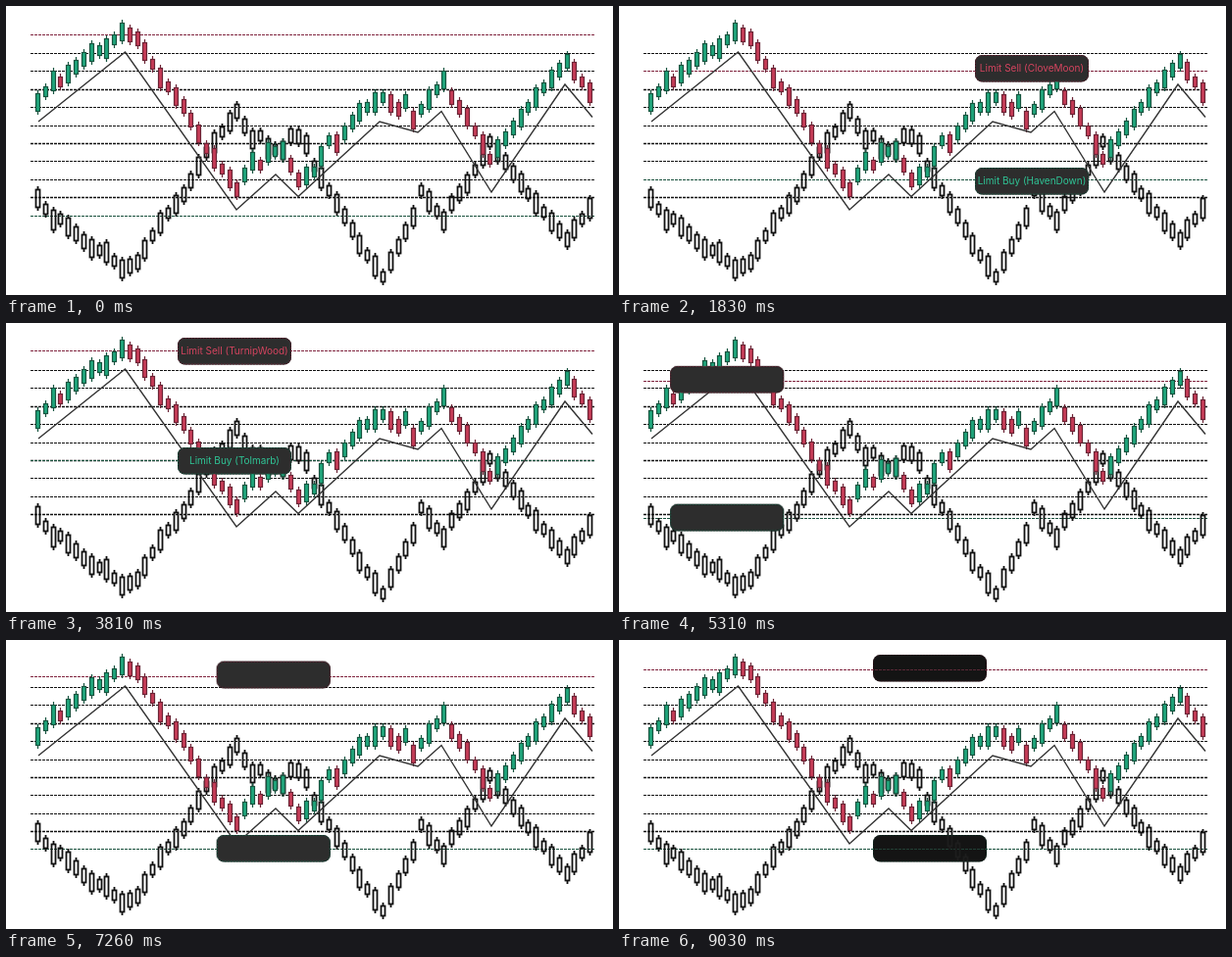
Write an HTML page that moves like this. It is 619 by 295 pixels and loops after 9060 ms.

```html
<!DOCTYPE html>
<html lang="en">
<head>
<meta charset="utf-8">
<title>Limit orders</title>
<style>
html, body { margin: 0; width: 100%; height: 100%; overflow: hidden; background: #fff; }
svg { display: block; width: 619px; height: 295px; }

.move, .back, .box, .label { animation: 9060ms linear infinite; }
.move { animation-name: move; animation-timing-function: cubic-bezier(.33, 1, .68, 1); }
.back { animation-name: back; }
.box { animation-name: box; }

/* Stops of each moving part, in order */
.sell { --a: 496px 15px; --b: 363px 50px; --c: 175px 15px; --d: 22px 51px; --e: 259px 15px; }
.buy { --a: 496px 199px; --b: 363px 165px; --c: 175px 127px; --d: 22px 199px; --e: 259px 199px; }
.ask { --a: 0 29px; --b: 0 66px; --c: 0 28px; --d: 0 66px; --e: 0 30px; stroke: #80253f; }
.bid { --a: 0 214px; --b: 0 177px; --c: 0 140px; --d: 0 213px; --e: 0 213px; stroke: #19513d; }

.rule { stroke-width: 1; stroke-dasharray: 3 1; shape-rendering: crispEdges; }
.grid { stroke: #111; }
.grid.bold { stroke-width: 1.5; shape-rendering: auto; }
.trend { fill: none; stroke: #333; stroke-width: 1.4; }

.candle { stroke-width: 1.2; }
.up { fill: #20a67c; stroke: #17543f; }
.down { fill: #c63c57; stroke: #6b2435; }
.hollow { fill: none; stroke: #111; stroke-width: 1.8; }

.box rect { fill: #2d2d2d; stroke-width: 1; stroke-dasharray: 2 1; }
.sell .box rect { stroke: #5e2634; }
.buy .box rect { stroke: #1f5443; }
.label { font: 400 10px Inter, "Open Sans", sans-serif; text-anchor: middle; }
.sell .label { fill: #d5445f; }
.buy .label { fill: #2fc596; }
.t0 { animation-name: t0; }
.t1 { animation-name: t1; }
.t2 { animation-name: t2; }
.t3 { animation-name: t3; }
.t4 { animation-name: t4; }

@keyframes move {
  0%, 11.42% { translate: var(--a); }
  20.5%, 31.9% { translate: var(--b); }
  42.05%, 54.3% { translate: var(--c); }
  64.57%, 75.7% { translate: var(--d); }
  86%, 100% { translate: var(--e); }
}
@keyframes back {
  0%, .3% { opacity: 0; }
  .31%, 100% { opacity: 1; }
}
@keyframes box {
  0%, .3% { opacity: 0; }
  .31% { opacity: .1; }
  4.97%, 96.85% { opacity: 1; }
  100% { opacity: .4; }
}
@keyframes t0 {
  0%, 1.5% { opacity: 0; }
  4.97%, 11.42% { opacity: 1; }
  13.6%, 100% { opacity: 0; }
}
@keyframes t1 {
  0%, 16.4% { opacity: 0; }
  20.2%, 31.9% { opacity: 1; }
  34.1%, 100% { opacity: 0; }
}
@keyframes t2 {
  0%, 37.5% { opacity: 0; }
  42.05%, 54.3% { opacity: 1; }
  56.5%, 100% { opacity: 0; }
}
@keyframes t3 {
  0%, 60% { opacity: 0; }
  67.5% { opacity: .92; }
  75.7% { opacity: 1; }
  77.9%, 100% { opacity: 0; }
}
@keyframes t4 {
  0%, 81.5% { opacity: 0; }
  86.1%, 96.85% { opacity: 1; }
  98.9%, 100% { opacity: 0; }
}
</style>
</head>
<body>
<svg id="stage" viewBox="0 0 619 295"></svg>
<script>
const names = {
  Sell: ["FernyDock", "CloveMoon", "TurnipWood", "VoKn", "MistyOak"],
  Buy: ["PlumeHut", "HavenDown", "Tolmarb", "GolNob", "Gorseby"]
};

const count = 73;
const mirror = 294.5;

// Turning points: candle index, y of the body's middle
const price = [
  [0, 98], [2, 76], [3, 77], [7, 47], [9, 43], [11, 26], [13, 33], [16, 73], [19, 102],
  [22, 145], [26, 187], [28, 158], [29, 162], [30, 149], [32, 147], [34, 177], [36, 169],
  [38, 137], [39, 140], [42, 108], [45, 93], [47, 105], [48, 97], [49, 116], [53, 75],
  [54, 93], [56, 113], [59, 156], [65, 93], [69, 56], [72, 88]
];
// Where the hollow series leaves the mirrored price
const dip = [[34, 133], [35, 141], [36, 163], [40, 214], [42, 243], [45, 276], [49, 215]];

function along(points, i) {
  const k = Math.max(1, points.findIndex(p => p[0] >= i));
  const [x0, y0] = points[k - 1], [x1, y1] = points[k];
  return y0 + (y1 - y0) * (i - x0) / (x1 - x0);
}

function bodySize(i) {
  return Math.round(16 + 5 * Math.cos(Math.PI * i) * Math.cos(Math.PI * (i - 2) / 7));
}

function candle(i, middle, kind) {
  const x = Math.round(33 + i * 7.82) - .5;
  const size = bodySize(i);
  const top = Math.round(middle - size / 2);
  return `<g class="candle ${kind}">
    <path d="M${x} ${top - 3}v3M${x} ${top + size}v3"/>
    <rect x="${x - 2}" y="${top + .5}" width="4" height="${size - 1}"/></g>`;
}

function solid(i) {
  const y = along(price, i);
  const falls = i > 0 && y > along(price, i - 1);
  return candle(i, y, falls ? "down" : "up");
}

function hollow(i) {
  const inDip = i >= dip[0][0] && i <= dip.at(-1)[0];
  return candle(i, inDip ? along(dip, i) : mirror - along(price, i), "hollow");
}

function repeat(n, draw) {
  return Array.from({ length: n }, (_, i) => draw(i)).join("");
}

function rule(y, kind) {
  return `<path class="rule ${kind}" d="M25 ${y}H600"/>`;
}

function gridRule(i) {
  return rule(Math.round(48 + i * 18.4) + .5, i % 3 === 2 ? "grid bold" : "grid");
}

function card(side) {
  const text = names[side].map((name, i) =>
    `<text class="label t${i}" x="58" y="17">Limit ${side} (${name})</text>`).join("");
  return `<g class="move ${side.toLowerCase()}">
    <g class="box"><rect x=".5" y=".5" width="115" height="26.5" rx="7"/></g>${text}</g>`;
}

function back(side) {
  return `<g class="move ${side}"><rect class="back" width="116" height="27.5" rx="7.5"/></g>`;
}

document.getElementById("stage").innerHTML =
  back("sell") + back("buy") + repeat(9, gridRule) +
  rule(.5, "move ask") + rule(.5, "move bid") +
  repeat(count, hollow) + repeat(count, solid) +
  `<path class="trend" d="M33 118L121.5 47 235 208 275 172 298 194.5 381 118 420 129 444 107.5 495 190 570 80 598 113.5"/>` +
  card("Sell") + card("Buy");
</script>
</body>
</html>
```
